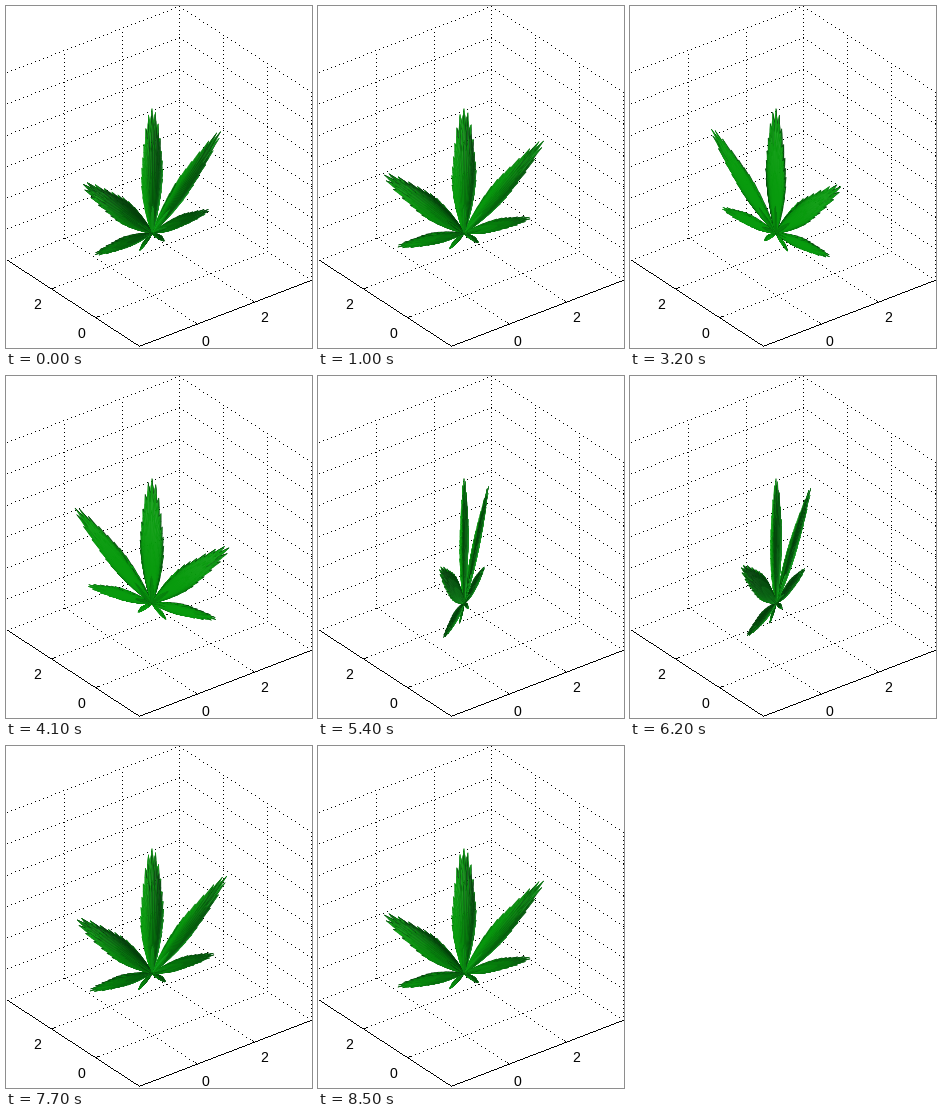
A matplotlib script for the animation above (8.6 s loop, 306 by 342 pixels).

```python
import numpy as np
import matplotlib.pyplot as plt
from matplotlib.animation import FuncAnimation
from matplotlib.collections import PolyCollection

W, H, DPI = 306, 342, 72
FRAMES, INTERVAL = 86, 100
SCALE = 36.15                      # pixels per unit
CX, CY = 146.0, 227.0              # screen place of the origin
AZ, EL = np.radians(37.5), np.radians(30)
SE, CE = np.sin(EL), np.cos(EL)


def to_screen(x, depth, z):
    return CX + SCALE * x, CY - SCALE * (CE * z + SE * depth)


def world(x, y, z):
    c, s = np.cos(AZ), np.sin(AZ)
    return to_screen(x * c - y * s, x * s + y * c, z)


def leaf_mesh():
    """Thin closed surface: front sheet, serrated rim, back sheet."""
    t = np.linspace(0, 2 * np.pi, 801)
    r = ((1 + .9 * np.cos(8 * t)) * (1 + .1 * np.cos(24 * t))
         * (.9 + .05 * np.cos(200 * t)) * (1 + np.sin(t)))
    lobe = np.round(t / (np.pi / 4)) * np.pi / 4
    size = .92 * (1 + np.sin(lobe)) + 1e-6
    v = np.array([0, .25, .5, .75, .92, 1])
    v = np.concatenate([v, v[::-1]])[:, None]
    side = np.where(np.arange(12) < 6, 1, -1)[:, None]
    rho = v * r
    half = np.arccos(np.clip((rho / size - 1) / .9, -1, 1)) / 8
    bulge = .08 * rho * np.sqrt(np.maximum(half**2 - (t - lobe)**2, 0))
    rim = .02 * rho / (rho + .3) * np.clip(1 - (rho / (2.1 * size))**2, 0, 1)
    return np.stack([rho * np.cos(t), side * (bulge + rim),
                     rho * np.sin(t)], axis=-1)


def mesh_quads(mesh):
    corners = [mesh[:-1, :-1], mesh[:-1, 1:], mesh[1:, 1:], mesh[1:, :-1]]
    return np.stack(corners, axis=2).reshape(-1, 4, 3)


def normals(quads):
    n = np.cross(quads[:, 2] - quads[:, 0], quads[:, 3] - quads[:, 1])
    size = np.linalg.norm(n, axis=1)
    return n / (size[:, None] + 1e-12), size


def unit(*v):
    return np.array(v) / np.linalg.norm(v)


def ramp(x, lo=0):
    x = np.clip((x - lo) / (1 - lo), 0, 1)
    return x * x * (3 - 2 * x)


def turn(v, phi):
    c, s = np.cos(phi), np.sin(phi)
    return v @ np.array([[c, s, 0], [-s, c, 0], [0, 0, 1]])


MESH = leaf_mesh()
QUADS = mesh_quads(MESH)
FACING, AREA = normals(QUADS)
# shading uses a rounder leaf than the drawn one
ROUND, _ = normals(mesh_quads(MESH * [1, 7, 1]))
QUADS, FACING, ROUND = (a[AREA > 2e-5] for a in (QUADS, FACING, ROUND))

KEY = unit(-.5, -.87, .1)
FILL = unit(.6, .3, -.7)
EYE = np.array([0, -CE, SE])


def angle(i):
    return np.radians(37.5 if i == 0 else 21.6 * i - 12.9)


def leaf_polys(phi):
    seen = turn(FACING, phi) @ EYE > 0
    quads, n = turn(QUADS[seen], phi), turn(ROUND[seen], phi)
    order = np.argsort(quads.mean(axis=1) @ EYE)
    quads, n = quads[order], n[order]
    key, fill = ramp(n @ KEY), ramp(n @ FILL, .2)
    rgb = np.stack([.01 + .02 * key + .10 * fill,
                    .25 + .36 * key + .42 * fill,
                    .04 + .01 * key + .12 * fill], axis=-1)
    xy = np.stack(to_screen(*np.moveaxis(quads, -1, 0)), axis=-1)
    return xy, np.clip(rgb, 0, 1)


fig = plt.figure(figsize=(W / DPI, H / DPI), dpi=DPI, facecolor="white")
ax = fig.add_axes([0, 0, 1, 1])
ax.set_xlim(0, W)
ax.set_ylim(H, 0)
ax.axis("off")


def segment(p, q, step=4):
    """One-pixel line; a step above 1 makes it dotted."""
    a, b = np.array(world(*p)), np.array(world(*q))
    count = np.abs(b - a).max()
    k = np.arange(0, count, step)[:, None]
    x, y = (np.floor(a + (b - a) * k / count) + .5).T
    ax.plot(x, y, ",", color="black", zorder=1)


LO, HI = -2, 4
for k in range(LO, HI + 1):
    segment((HI, HI, k), (LO, HI, k))
    segment((HI, HI, k), (HI, LO, k))
for k in (0, 2, 4):
    segment((k, HI, LO), (k, HI, HI))
    if k < HI:
        segment((k, LO, LO), (k, HI, LO))
        segment((LO, k, LO), (HI, k, LO))
for k in (2, 0, -2):
    segment((HI, k, LO), (HI, k, HI))

segment((LO, LO, LO), (HI, LO, LO), 1)
segment((LO, LO, LO), (LO, HI, LO), 1)
for k in (0, 2):
    segment((k, LO, LO), (k, LO + .13, LO), 1)
    segment((LO, k, LO), (LO + .13, k, LO), 1)

for x, y, label in [(199, 334, "0"), (258, 310, "2"),
                    (75.5, 326, "0"), (31.5, 297.5, "2")]:
    ax.text(x, y, label, family="Liberation Sans", fontsize=14,
            ha="center", va="center_baseline")

leaf = PolyCollection([], linewidths=.35, zorder=2)
ax.add_collection(leaf, autolim=False)


def update(i):
    xy, rgb = leaf_polys(angle(i))
    leaf.set_verts(xy)
    leaf.set_facecolor(rgb)
    leaf.set_edgecolor(rgb)
    return (leaf,)


anim = FuncAnimation(fig, update, frames=FRAMES, interval=INTERVAL,
                     init_func=lambda: update(0), repeat=True, repeat_delay=0)
plt.show()
```
